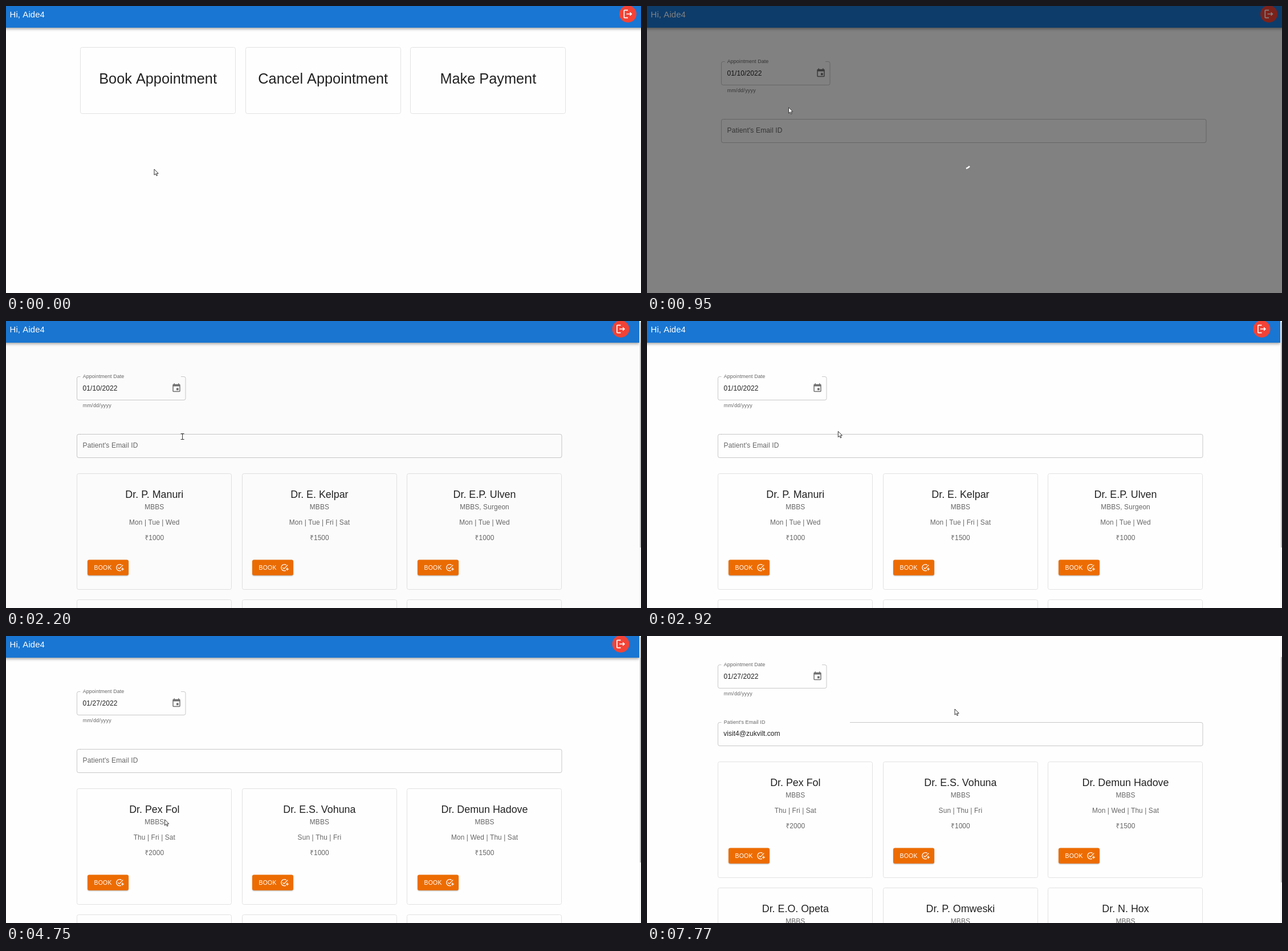
Recreate the animation shown at these times as an HTML page with a canvas. Size 1114 by 503 pixels, loop 8000 ms.

```html
<!DOCTYPE html>
<html lang="en">
<head>
<meta charset="utf-8">
<title>Appointment booking</title>
<style>
  html, body { margin: 0; width: 100%; height: 100%; overflow: hidden; background: #fefefe; }
  canvas { display: block; }
</style>
</head>
<body>
<canvas id="stage" width="1114" height="503"></canvas>
<script>
const ctx = document.getElementById('stage').getContext('2d');
const W = 1114, H = 503, LOOP = 8000;
const FONT = '"Liberation Sans", Arial, sans-serif';
const BLUE = '#1976d2', INK = 'rgba(0,0,0,.87)', SOFT = 'rgba(0,0,0,.6)', LINE = 'rgba(0,0,0,.21)';

// Key moments in ms
const PAGE = 752, DIM = 762, CARDS = 1980, UNDIM = 2045, OPEN = 3680, PICK = 4400,
      RELOAD = 4480, SCROLL = 5610, BLUR = 7630;

const EVENT = new Path2D('M17 12h-5v5h5v-5zM16 1v2H8V1H6v2H5c-1.1 0-2 .9-2 2v14c0 1.1.9 2 2 2h14c1.1 0 2-.9 2-2V5c0-1.1-.9-2-2-2h-1V1h-2zm3 18H5V8h14v11z');
const LOGOUT = new Path2D('M17 8l-1.41 1.41L17.17 11H9v2h8.17l-1.58 1.58L17 16l4-4-4-4zM5 5h7V3H5c-1.1 0-2 .9-2 2v14c0 1.1.9 2 2 2h7v-2H5V5z');
const ADD_TASK = new Path2D('M22 5.18 10.59 16.6l-4.24-4.24 1.41-1.41 2.83 2.83 10-10L22 5.18zM12 20c-4.41 0-8-3.59-8-8s3.59-8 8-8c1.57 0 3.04.46 4.28 1.25l1.45-1.45C16.1 2.67 14.13 2 12 2 6.48 2 2 6.48 2 12s4.48 10 10 10c1.73 0 3.36-.44 4.78-1.22l-1.5-1.5c-1 .46-2.11.72-3.28.72zm7-5h-3v2h3v3h2v-3h3v-2h-3v-3h-2v3z');
const ARROW = new Path2D('M0 0V10.2L2.4 8L4 11.6L5.6 10.9L4.1 7.4H7.2Z');
const HAND = new Path2D('M0 1Q1 -.6 2 1V5.2L6.8 6Q8.2 6.3 8 7.8L7.3 11.5V13H.6V11.6L-3.4 7.6Q-3.2 6 -1.8 6.6L0 8Z');

const MONDAY_SET = [
  ['Dr. P. Manuri', 'MBBS', 'Mon | Tue | Wed', '₹1000'],
  ['Dr. E. Kelpar', 'MBBS', 'Mon | Tue | Fri | Sat', '₹1500'],
  ['Dr. E.P. Ulven', 'MBBS, Surgeon', 'Mon | Tue | Wed', '₹1000']
];
const THURSDAY_SET = [
  ['Dr. Pex Fol', 'MBBS', 'Thu | Fri | Sat', '₹2000'],
  ['Dr. E.S. Vohuna', 'MBBS', 'Sun | Thu | Fri', '₹1000'],
  ['Dr. Demun Hadove', 'MBBS', 'Mon | Wed | Thu | Sat', '₹1500']
];
const SECOND_ROW = [
  ['Dr. E.O. Opeta', 'MBBS', '', ''],
  ['Dr. P. Omweski', 'MBBS', '', ''],
  ['Dr. N. Hox', 'MBBS', '', '']
];

// Pointer: time, x, y
const PATH = [
  [70, 260, 286], [480, 232, 150], [640, 232, 150], [820, 247, 177], [1500, 255, 181],
  [2050, 270, 188], [2200, 309, 202], [2590, 345, 214], [2780, 345, 214], [3450, 299, 116],
  [3660, 299, 118], [3780, 290, 272], [3880, 255, 297], [4200, 231, 329], [4420, 231, 329],
  [5200, 343, 312], [SCROLL - 1, 343, 312], [SCROLL, 306, 176], [7140, 306, 176], [7560, 540, 128]
];
const SHAPES = [
  [0, 'arrow'], [340, 'hand'], [PAGE, 'arrow'], [2120, 'beam'], [2900, 'arrow'], [3330, 'hand'],
  [4440, 'arrow'], [SCROLL, 'beam'], [7340, 'arrow']
];

const clamp = v => Math.max(0, Math.min(1, v));
const mix = (a, b, k) => a + (b - a) * k;

function bezier(x1, y1, x2, y2) {
  const at = (a, b, u) => 3 * a * u * (1 - u) ** 2 + 3 * b * u * u * (1 - u) + u ** 3;
  return x => {
    x = clamp(x);
    let lo = 0, hi = 1;
    for (let i = 0; i < 20; i++) {
      const mid = (lo + hi) / 2;
      if (at(x1, x2, mid) < x) lo = mid; else hi = mid;
    }
    return at(y1, y2, lo);
  };
}
const standard = bezier(.4, 0, .2, 1);
const easeOut = bezier(0, 0, .2, 1);
const easeInOut = bezier(.42, 0, .58, 1);

function text(str, x, y, size, color = INK, align = 'left', spacing = .11) {
  ctx.font = `${size}px ${FONT}`;
  ctx.letterSpacing = spacing + 'px';
  ctx.textAlign = align;
  ctx.fillStyle = color;
  ctx.fillText(str, x, y);
}

function icon(path, cx, cy, size, color) {
  ctx.save();
  ctx.translate(cx - size / 2, cy - size / 2);
  ctx.scale(size / 24, size / 24);
  ctx.fillStyle = color;
  ctx.fill(path);
  ctx.restore();
}

function disc(x, y, r, color) {
  ctx.fillStyle = color;
  ctx.beginPath();
  ctx.arc(x, y, r, 0, 7);
  ctx.fill();
}

function raised(x, y, w, h, r, color, alpha, blur, drop) {
  ctx.save();
  ctx.shadowColor = `rgba(0,0,0,${alpha})`;
  ctx.shadowBlur = blur;
  ctx.shadowOffsetY = drop;
  ctx.fillStyle = color;
  ctx.beginPath();
  ctx.roundRect(x, y, w, h, r);
  ctx.fill();
  ctx.restore();
}

function frame(x, y, w, h) {
  ctx.strokeStyle = '#e2e2e2';
  ctx.lineWidth = 1;
  ctx.beginPath();
  ctx.roundRect(x + .5, y + .5, w, h, 3);
  ctx.stroke();
}

// Field border, open along the top from the left corner to gapEnd
function outline(x, y, w, h, gapEnd, color = LINE, width = 1) {
  const r = 3, right = x + w, bottom = y + h;
  ctx.strokeStyle = color;
  ctx.lineWidth = width;
  ctx.beginPath();
  ctx.moveTo(gapEnd, y);
  ctx.arcTo(right, y, right, bottom, r);
  ctx.arcTo(right, bottom, x, bottom, r);
  ctx.arcTo(x, bottom, x, y, r);
  ctx.arcTo(x, y, right, y, r);
  ctx.lineTo(x + 6, y);
  ctx.stroke();
}

function header(inset) {
  raised(-10, -20, W + 20 - (inset ? 13 : 0), 58, 0, BLUE, .38, 5, 2);
  text('Hi, Aide4', 6.6, 19.7, 14.88, '#fff');
  const x = inset ? 1078.5 : 1091;
  disc(x, 14, 15, '#f44336');
  icon(LOGOUT, x, 14, 20, '#fff');
}

function dashboard() {
  ['Book Appointment', 'Cancel Appointment', 'Make Payment'].forEach((title, i) => {
    const x = 130 + i * 289.6;
    frame(Math.round(x), 72, 272, 116);
    text(title, x + 136.6, 135.5, 25.3, INK, 'center', 0);
  });
}

function card(x, y, [name, degree, days, fee]) {
  const mid = x + 136.3;
  frame(Math.round(x), y, 271, 203);
  text(name, mid, y + 43, 17.86, INK, 'center', 0);
  text(degree, mid, y + 62.5, 11.9, SOFT, 'center');
  text(days, mid, y + 89.5, 11.9, SOFT, 'center');
  text(fee, mid, y + 117, 11.9, SOFT, 'center');
  const bx = Math.round(x + 18.5);
  raised(bx, y + 151.5, 72, 27.3, 3, '#ed6c02', .3, 2, 1);
  text('BOOK', bx + 11.5, y + 168.8, 10.4, '#fff', 'left', .3);
  icon(ADD_TASK, bx + 56.5, y + 165.3, 14.9, '#fff');
}

function dateField(t, x) {
  const shift = 1 - easeOut((t - DIM) / 200);
  outline(x + .5, 97.5, 190.5, 41, t < PAGE + 110 ? x + 6 : x + 183);
  text('Appointment Date', x + 10.7, 100.2 + shift * 21.5, mix(8.93, 11.9, shift), SOFT, 'left', .08);
  text(t < PICK ? '01/10/2022' : '01/27/2022', x + 10.5, 122, 12);
  if (t > 3330 && t < 4440) disc(x + 175, 117.8, 13, 'rgba(0,0,0,.1)');
  icon(EVENT, x + 175, 117.5, 17.9, 'rgba(0,0,0,.56)');
  text('mm/dd/yyyy', x + 10.7, 151, 8.93, SOFT, 'left', .28);
}

function emailField(t, x) {
  if (t < SCROLL) {
    outline(x + .5, 198.5, 850.5, 41, x + 6);
    text("Patient's Email ID", x + 10.5, 222.3, 12, SOFT, 'left', .15);
    return;
  }
  const focus = t < BLUR;
  if (focus) outline(x + 1, 198.2, 850, 40.5, x + 233, BLUE, 1.6);
  else outline(x + .5, 198.5, 850.5, 41, x + 232);
  text("Patient's Email ID", x + 10.7, 200.8, 8.93, focus ? BLUE : SOFT, 'left', .15);

  const missing = t < 5680 ? 2 : t < 6270 ? 1 : 0;
  const full = 'visit4@zukvilt.com';
  const typed = full.slice(0, full.length - missing);
  text(typed, x + 10.3, 222, 12, INK, 'left', .02);
  const caret = t < 6000 || (t >= 6270 && t < 6800) || t >= 7330;
  if (focus && caret) {
    ctx.fillStyle = '#222';
    ctx.fillRect(Math.round(x + 9.6 + ctx.measureText(typed).width), 211, 1, 14);
  }
}

function pointer(t) {
  const i = PATH.findIndex(k => k[0] > t);
  if (i === 0) return PATH[0].slice(1);
  if (i < 0) return PATH[PATH.length - 1].slice(1);
  const [t0, x0, y0] = PATH[i - 1], [t1, x1, y1] = PATH[i];
  const k = (t - t0) / (t1 - t0);
  return [mix(x0, x1, k), mix(y0, y1, k)];
}

function chevron(x, dir, color) {
  ctx.strokeStyle = color;
  ctx.lineWidth = 1.5;
  ctx.beginPath();
  ctx.moveTo(x - 2 * dir, 157);
  ctx.lineTo(x + 2 * dir, 161);
  ctx.lineTo(x - 2 * dir, 165);
  ctx.stroke();
}

function calendar(t) {
  const leaving = t >= PICK;
  if (t < OPEN || t > PICK + 324) return;
  const seen = leaving ? 1 - standard((t - PICK) / 324) : standard((t - OPEN) / 324);
  const grow = leaving ? 1 - standard((t - PICK - 108) / 216) : standard((t - OPEN) / 216);
  ctx.save();
  ctx.globalAlpha = seen;
  ctx.translate(201.5, 138);
  ctx.scale(mix(.75, 1, grow), mix(.5625, 1, grow));
  ctx.translate(-201.5, -138);

  raised(84, 138.5, 235, 261, 3, '#fff', .42, 9, 3);
  text('January 2022', 102, 165.2, 11.9, 'rgba(0,0,0,.75)');
  ctx.fillStyle = SOFT;
  ctx.beginPath();
  ctx.moveTo(188.5, 159.5);
  ctx.lineTo(196, 159.5);
  ctx.lineTo(192.2, 163.3);
  ctx.fill();
  chevron(259.5, -1, 'rgba(0,0,0,.28)');
  chevron(297.5, 1, SOFT);

  const colX = c => 113.5 + c * 29.3, rowY = r => 220.5 + r * 27.75;
  [...'SMTWTFS'].forEach((d, c) => text(d, colX(c), 194.5, 8.6, SOFT, 'center', 0));
  const [px, py] = pointer(t - 100);
  const chosen = leaving ? 27 : 10;
  for (let day = 1; day <= 31; day++) {
    const x = colX((day + 5) % 7), y = rowY(Math.floor((day + 5) / 7));
    const hover = day > 9 && Math.abs(px - x) < 13.5 && Math.abs(py - y) < 13.5;
    if (day === chosen) disc(x, y, 13.3, BLUE);
    else if (hover) disc(x, y, 13.3, 'rgba(0,0,0,.05)');
    const color = day === chosen ? '#fff' : day < 10 ? 'rgba(0,0,0,.4)' : INK;
    text(day, x, y + 3.2, 8.93, color, 'center', .2);
  }
  ctx.restore();
}

function backdrop(t) {
  const level = t < UNDIM ? standard((t - DIM) / 225) : 1 - standard((t - UNDIM) / 195);
  if (t < DIM || level <= 0) return;
  ctx.fillStyle = `rgba(0,0,0,${.5 * level})`;
  ctx.fillRect(0, 0, t < CARDS ? W : 1111, H);

  // Spinner arc: grows, then its tail catches up with its head
  const phase = Math.max(0, (t - 797) / 1400) % 1;
  const round = 126.9;
  const e = easeInOut(phase < .5 ? phase * 2 : phase * 2 - 1);
  const tail = phase < .5 ? 15 * e : mix(15, 125, e);
  const length = phase < .5 ? mix(1, 100, e) : 100;
  const head = Math.min(round, tail + length);
  const turn = (5 + .238 * (t - 820)) * Math.PI / 180;
  const rad = Math.PI * 2 / round;
  ctx.strokeStyle = `rgba(255,255,255,${level})`;
  ctx.lineWidth = 2.45;
  ctx.beginPath();
  ctx.arc(555.5, 272, 13.66, turn + tail * rad, turn + head * rad);
  ctx.stroke();
}

function scrollbar(scroll) {
  ctx.fillStyle = '#f6f6f6';
  ctx.fillRect(1111, 0, 3, H);
  ctx.fillStyle = '#c1c1c1';
  ctx.fillRect(1112, 2 + scroll * .74, 2, 395);
}

function cursor(t) {
  const [x, y] = pointer(t);
  const shape = SHAPES.filter(s => s[0] <= t).pop()[1];
  ctx.save();
  ctx.translate(x, y);
  ctx.lineWidth = 1;
  ctx.strokeStyle = '#333';
  if (shape === 'beam') {
    ctx.beginPath();
    for (const end of [-5, 5]) {
      ctx.moveTo(-2.5, end + .5);
      ctx.lineTo(3.5, end + .5);
    }
    ctx.moveTo(.5, -4.5);
    ctx.lineTo(.5, 5.5);
    ctx.stroke();
  } else {
    const path = shape === 'hand' ? HAND : ARROW;
    ctx.fillStyle = '#fff';
    ctx.fill(path);
    ctx.stroke(path);
  }
  ctx.restore();
}

function draw(t) {
  const loaded = t >= CARDS;
  const scroll = t >= SCROLL ? 47 : 0;
  const left = loaded ? 124 : 130;
  ctx.fillStyle = '#fefefe';
  ctx.fillRect(0, 0, W, H);
  ctx.save();
  ctx.translate(0, -scroll);
  header(loaded);
  if (t < PAGE) dashboard();
  else {
    dateField(t, left);
    emailField(t, left);
  }
  if (loaded) {
    const rows = [t < RELOAD ? MONDAY_SET : THURSDAY_SET, SECOND_ROW];
    rows.forEach((row, r) => row.forEach((doc, c) => card(left + c * 289.6, 267 + r * 221, doc)));
  }
  calendar(t);
  ctx.restore();
  backdrop(t);
  if (loaded) scrollbar(scroll);
  cursor(t);
}

const start = performance.now();
function tick() {
  draw((performance.now() - start) % LOOP);
  requestAnimationFrame(tick);
}
tick();
</script>
</body>
</html>
```
